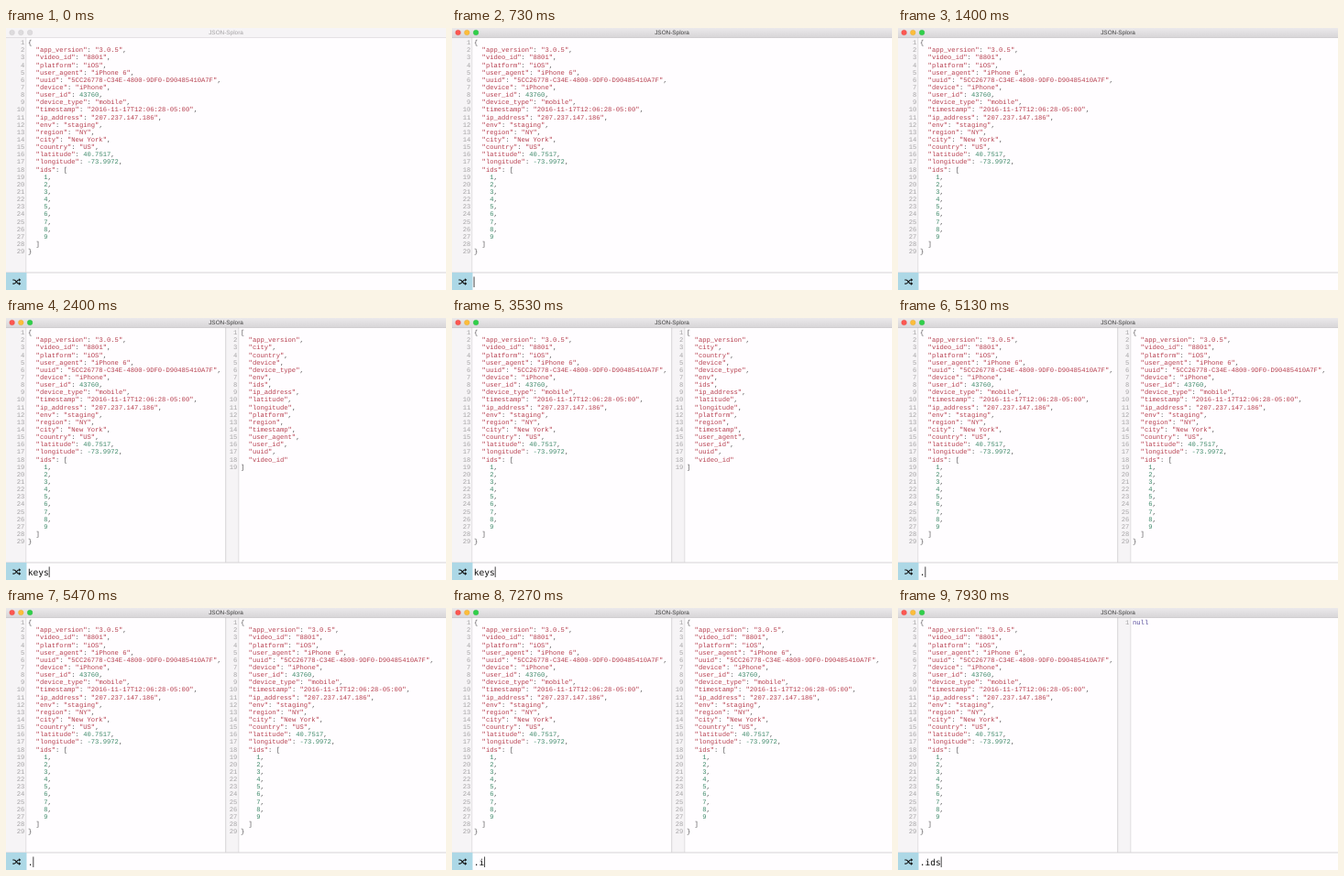
Animation, 480 px wide and 286 px high, one loop 8 s. Source, as an HTML page:

```html
<!DOCTYPE html>
<html lang="en">
<head>
<meta charset="utf-8">
<title>JSON-Splora</title>
<style>
  html, body { margin: 0; width: 100%; height: 100%; overflow: hidden; background: #fffdff; }
  svg { display: block; width: 480px; height: 286px; }
  text { text-rendering: geometricPrecision; white-space: pre; }
  .code text { font: 7.17px "Liberation Mono", "Courier New", monospace; fill: #555355; }
  .code .num { fill: #a6a4a6; text-anchor: end; }
  .code .string { fill: #b63f4e; }
  .code .number { fill: #3f8a6a; }
  .code .atom { fill: #544a9a; }
  .title { font: 6.4px "Liberation Sans", Arial, sans-serif; text-anchor: middle; }
  .query { font: 9.6px "DejaVu Sans Mono", monospace; fill: #111; }
</style>
</head>
<body>
<svg viewBox="0 0 480 286">
  <defs>
    <linearGradient id="chrome" x2="0" y2="1">
      <stop offset="0" stop-color="#ebe9eb"/>
      <stop offset="1" stop-color="#d8d6d8"/>
    </linearGradient>
  </defs>
  <rect width="480" height="286" fill="#fffdff"/>
  <g id="left" class="code"></g>
  <g id="right"></g>

  <rect id="bar" width="480" height="10"/>
  <rect id="barEdge" y="10" width="480" height="0.7"/>
  <g id="lights" stroke-width="0.4">
    <circle cx="6.6" cy="5" r="2.8"/>
    <circle cx="16.3" cy="5" r="2.8"/>
    <circle cx="26.1" cy="5" r="2.8"/>
  </g>
  <text id="title" class="title" x="240" y="7.2">JSON-Splora</text>

  <rect y="267" width="480" height="19" fill="#fffdff"/>
  <rect y="266.5" width="480" height="1" fill="#d6d4d6"/>
  <rect y="267" width="22.5" height="19" fill="#add8e6"/>
  <g fill="none" stroke="#111" stroke-width="1.1">
    <path d="M7.3 275h1.4c2.5 0 2.9 4.1 5.2 4.1h0.8M7.3 279.1h1.4c2.5 0 2.9-4.1 5.2-4.1h0.8"/>
    <path d="M14.1 273.2l2.2 1.8-2.2 1.8zM14.1 277.3l2.2 1.8-2.2 1.8z" fill="#111" stroke="none"/>
  </g>
  <text id="query" class="query" x="23.8" y="280.5"></text>
  <rect id="caret" y="271.5" width="0.9" height="11.5" fill="#333"/>
</svg>
<script>
const LOOP = 8000, BLINK = 530, CHAR = 4.302, LINE = 8.14;
const $ = id => document.getElementById(id);

const data = {
  app_version: "3.0.5", video_id: "8801", platform: "iOS", user_agent: "iPhone 6",
  uuid: "5CC26778-C34E-4800-9DF0-D90485410A7F", device: "iPhone", user_id: 43760,
  device_type: "mobile", timestamp: "2016-11-17T12:06:28-05:00",
  ip_address: "207.237.147.186", env: "staging", region: "NY", city: "New York",
  country: "US", latitude: 40.7517, longitude: -73.9972,
  ids: [1, 2, 3, 4, 5, 6, 7, 8, 9]
};

function add(parent, tag, attrs, content = "") {
  const el = document.createElementNS("http://www.w3.org/2000/svg", tag);
  for (const key in attrs) el.setAttribute(key, attrs[key]);
  el.textContent = content;
  return parent.appendChild(el);
}

const kind = s => s[0] === '"' ? "string" : /\d/.test(s) ? "number" : s === "null" ? "atom" : "plain";

function editor(parent, value, x, gutter) {
  add(parent, "rect", { x, y: 10, width: gutter, height: 257, fill: "#f6f4f6" });
  add(parent, "rect", { x: x + gutter - 0.8, y: 10, width: 0.8, height: 257, fill: "#dddbdd" });
  JSON.stringify(value, null, 2).split("\n").forEach((line, i) => {
    const y = 18.2 + i * LINE;
    add(parent, "text", { class: "num", x: x + gutter - 1.8, y }, i + 1);
    for (const m of line.matchAll(/"[^"]*"|-?\d[\d.]*|null|[^\s"\d]+/g))
      add(parent, "text", { class: kind(m[0]), x: x + gutter + 1.8 + m.index * CHAR, y }, m[0]);
  });
}

function result(value) {
  const g = add($("right"), "g", { class: "code" });
  add(g, "rect", { x: 239, y: 10, width: 241, height: 257, fill: "#fffdff" });
  editor(g, value, 240, 14.2);
  add(g, "rect", { x: 239.2, y: 10, width: 1, height: 257, fill: "#d6d4d6" });
  return g;
}

editor($("left"), data, 0, 22.2);
const panes = {
  keys: result(Object.keys(data).sort()),
  same: result(data),
  none: result(null)
};

// [time, query]: each edit also restarts the caret blink
const edits = [
  [600, ""], [1600, "k"], [1800, "ke"], [1930, "key"], [2200, "keys"],
  [3730, "key"], [4130, "ke"], [4270, "k"], [4400, ""],
  [5000, "."], [7200, ".i"], [7500, ".id"], [7870, ".ids"]
];
const outputs = [[0, ""], [2330, "keys"], [3870, ""], [5130, "same"], [7330, "none"]];
const at = (steps, t) => steps.findLast(s => s[0] <= t);

const lightColors = [["#fc5650", "#e24b46"], ["#fdbd3a", "#e0a735"], ["#2fd04a", "#2ab43c"]];

function setActive(on) {
  $("bar").setAttribute("fill", on ? "url(#chrome)" : "#f6f4f6");
  $("barEdge").setAttribute("fill", on ? "#bebcbe" : "#d8d6d8");
  $("title").setAttribute("fill", on ? "#3c3c3c" : "#a2a0a2");
  [...$("lights").children].forEach((c, i) => {
    const [fill, stroke] = on ? lightColors[i] : ["#dddbdd", "#cac8ca"];
    c.setAttribute("fill", fill);
    c.setAttribute("stroke", stroke);
  });
}

function draw() {
  const t = performance.now() % LOOP;
  const edit = at(edits, t);
  const query = edit ? edit[1] : "";
  const shown = at(outputs, t)[1];
  setActive(!!edit);
  $("query").textContent = query;
  $("caret").setAttribute("x", 23.6 + query.length * 5.78);
  $("caret").style.display = edit && (t - edit[0]) % (2 * BLINK) < BLINK ? "" : "none";
  for (const name in panes) panes[name].style.display = name === shown ? "" : "none";
  requestAnimationFrame(draw);
}
draw();
</script>
</body>
</html>
```
